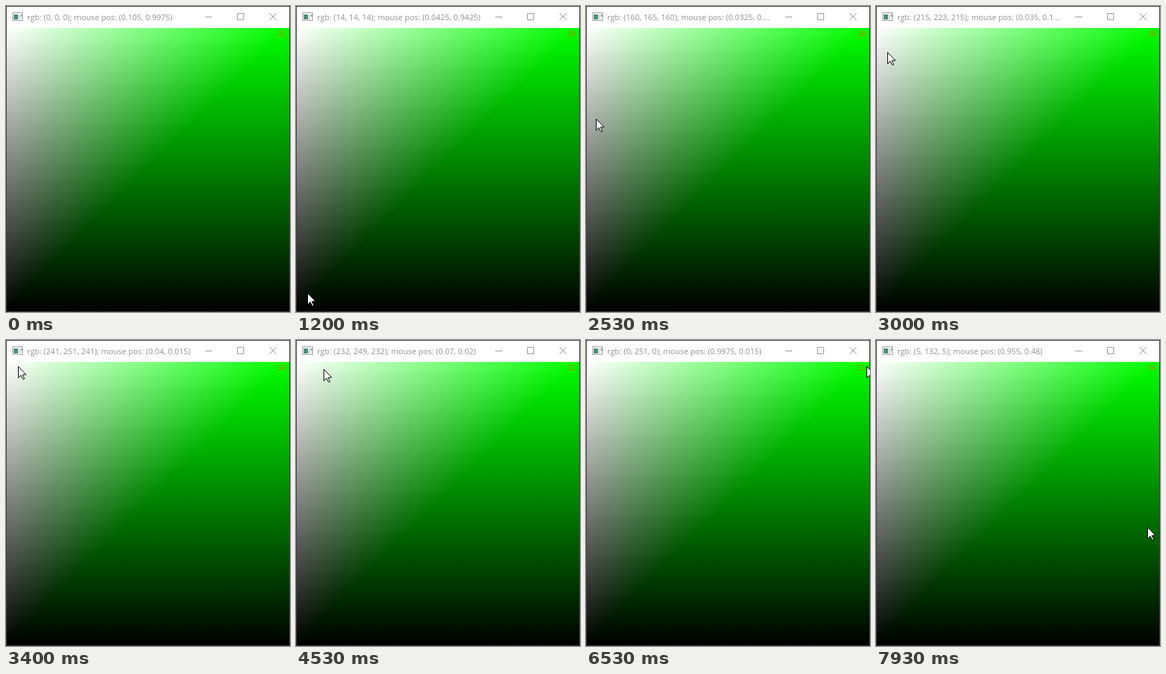
Write an HTML page that moves like this. It is 402x432 px and loops after 8000 ms.

```html
<!DOCTYPE html>
<html lang="en">
<head>
<meta charset="utf-8">
<title>Colour picker</title>
<style>
html, body { margin: 0; width: 402px; height: 432px; overflow: hidden; background: #fff; }
#field {
  position: absolute; left: 1px; top: 31px; width: 400px; height: 400px;
  background: linear-gradient(to bottom right, #f0f, #000 50%), linear-gradient(#0f0, #000);
  background-blend-mode: lighten;
}
svg { position: absolute; left: 0; top: 0; }
#title { font: 11.2px "Open Sans", "Noto Sans", sans-serif; fill: #919191; }
#fps { font: 10px "DejaVu Sans Mono", monospace; fill: #a89000; }
</style>
</head>
<body>
<div id="field"></div>
<svg width="402" height="432" fill="none">
  <rect x=".5" y=".5" width="401" height="431" stroke="#3c3c3c"/>
  <g id="icon">
    <rect x="9.5" y="9.5" width="14" height="11" fill="#f4f4f4" stroke="#a0a4a8"/>
    <rect x="11" y="12" width="6" height="7" fill="#4a8c78"/>
    <rect x="18" y="12" width="2" height="7" fill="#d0d8dc"/>
    <rect x="21" y="12" width="2" height="3" fill="#8aa8bc"/>
  </g>
  <path id="buttons" d="M282 15.5h10M327.5 10.5h9v9h-9zM373 10l10 10M383 10l-10 10" stroke="#999"/>
  <text id="title" x="30" y="20"></text>
  <text id="fps" x="384" y="43"></text>
  <path id="cursor" d="M.5 .5v16l3.7-3.7 2.5 5.2 1.2.5 1.2-.7-2.5-5.8h4.9z" fill="#fff" stroke="#000"/>
</svg>
<script>
const LOOP = 8000, FPS = 15, STEPS = 120, TITLE_WIDTH = 234;
const $ = id => document.getElementById(id);
const title = $('title'), fps = $('fps'), cursor = $('cursor');

// Mouse moves between rests; u ** ease shapes the speed (above 1 speeds up, below 1 slows down)
const start = { x: 43, y: 432 };
const moves = [
  { from: 7, to: 19, x: 13, y: 403 },
  { from: 19, to: 29, x: 13, y: 256 },
  { from: 29, to: 44, x: 15, y: 81, ease: 1.15 },
  { from: 44, to: 50, x: 17, y: 37, ease: 0.55 },
  { from: 65, to: 68, x: 39, y: 41, ease: 1.5 },
  { from: 68, to: 77, x: 223, y: 45 },
  { from: 77, to: 88, x: 400, y: 37 },
  { from: 97, to: 99, x: 394, y: 36 },
  { from: 105, to: 118, x: 383, y: 223, ease: 2.4 },
  { from: 118, to: 119, x: 384, y: 264 }
];

function mouseAt(step) {
  let { x, y } = start;
  for (const m of moves) {
    if (step <= m.from) break;
    const u = Math.min(1, (step - m.from) / (m.to - m.from)) ** (m.ease || 1);
    x += (m.x - x) * u;
    y += (m.y - y) * u;
  }
  return { x: Math.round(x), y: Math.round(y) };
}

function titleFor(mouse) {
  const clamp = v => Math.min(399, Math.max(0, v));
  const x = clamp(mouse.x - 1), y = clamp(mouse.y - 31);
  const value = 255 * (400 - y) / 400;
  const g = Math.floor(value), r = Math.floor(value * (400 - x) / 400);
  return `rgb: (${r}, ${g}, ${r}); mouse pos: (${x / 400}, ${y / 400})`;
}

function setTitle(text) {
  title.textContent = text;
  while (title.getComputedTextLength() > TITLE_WIDTH) {
    text = text.slice(0, -1);
    title.textContent = text + '...';
  }
}

function draw(step) {
  const { x, y } = mouseAt(step);
  cursor.setAttribute('transform', `translate(${x} ${y})`);
  // The title trails the pointer by one step
  setTitle(titleFor(mouseAt(step - 1)));
  const second = Math.floor(Math.max(0, step - 1) / FPS);
  fps.textContent = [0, 4, 6].includes(second) ? 31 : 30;
}

let shown = -1;
function tick() {
  const t = performance.now() % LOOP;
  const step = Math.min(STEPS - 1, Math.floor((t + 4) * FPS / 1000));
  if (step !== shown) draw(shown = step);
  requestAnimationFrame(tick);
}
tick();
</script>
</body>
</html>
```
